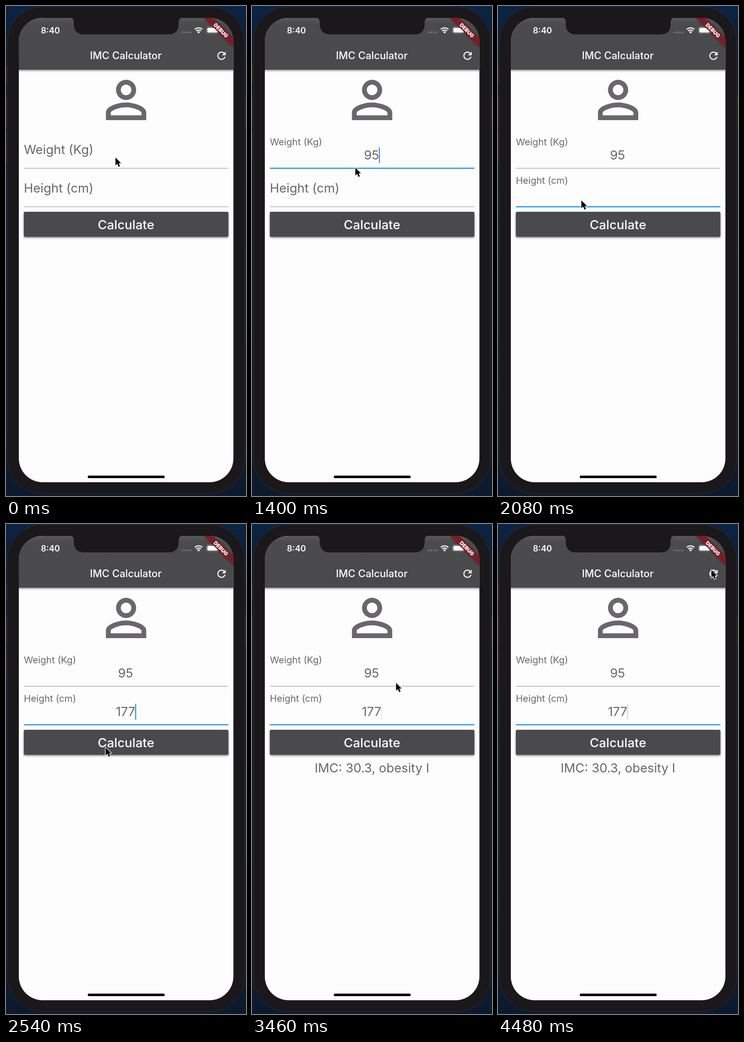
An HTML page that plays this animation: 524x1069 px, repeating every 4500 ms.

```html
<!DOCTYPE html>
<html lang="en">
<head>
<meta charset="utf-8">
<title>IMC Calculator</title>
<style>
html, body { margin: 0; width: 100%; height: 100%; overflow: hidden; background: #0a1a2e; }
svg { display: block; width: 100%; height: 100%; font-family: Inter, Roboto, sans-serif; }
.mid { text-anchor: middle; }
.grey { fill: #69676a; font-size: 27.4px; }
.rule { stroke: #8d8c8e; stroke-width: 1.2; }
.focus { stroke: #2196e8; stroke-width: 2.4; }
.caret { fill: #2b8fe0; }

/* One loop is 4500 ms: 1% = 45 ms */
.loop { animation: 4500ms linear infinite; }
.step { animation: 4500ms step-end infinite; }

.label { animation-timing-function: cubic-bezier(.4, 0, .2, 1); }
#label1 { animation-name: label1; }
#label2 { animation-name: label2; }
@keyframes label1 {
  0%, 2.222% { transform: none; }
  4.444%, 100% { transform: translateY(-19px) scale(.75); }
}
@keyframes label2 {
  0%, 37.111% { transform: none; }
  39.333%, 100% { transform: translateY(-19px) scale(.75); }
}

#focus1 { animation-name: focus1; }
#focus2 { animation-name: focus2; }
@keyframes focus1 {
  0%, 2.222% { opacity: 0; }
  4.444%, 37.111% { opacity: 1; }
  39.333%, 100% { opacity: 0; }
}
@keyframes focus2 {
  0%, 37.111% { opacity: 0; }
  39.333%, 100% { opacity: 1; }
}

#w1 { animation-name: w1; }
#w2 { animation-name: w2; }
#h1 { animation-name: h1; }
#h2 { animation-name: h2; }
#h3 { animation-name: h3; }
#result { animation-name: result; }
@keyframes w1 { 0%, 27.333%, 100% { opacity: 0; } 23.333% { opacity: 1; } }
@keyframes w2 { 0% { opacity: 0; } 27.333%, 100% { opacity: 1; } }
@keyframes h1 { 0%, 50.667%, 100% { opacity: 0; } 46.667% { opacity: 1; } }
@keyframes h2 { 0%, 54.333%, 100% { opacity: 0; } 50.667% { opacity: 1; } }
@keyframes h3 { 0% { opacity: 0; } 54.333%, 100% { opacity: 1; } }
@keyframes result { 0% { opacity: 0; } 61.333%, 100% { opacity: 1; } }

/* Carets: 250 ms on, 250 ms off, each change fading over 125 ms; typing restarts the blink */
#blink1 { animation-name: blink1; }
#blink2 { animation-name: blink2; }
#caret1 { animation-name: caret1; }
#caret2 { animation-name: caret2; }
@keyframes blink1 {
  0%, 2.221% { opacity: 0; }
  2.222%, 7.778% { opacity: 1; }
  10.556%, 13.333% { opacity: 0; }
  16.111%, 18.889% { opacity: 1; }
  21.667%, 23.332% { opacity: 0; }
  23.333%, 32.889% { opacity: 1; }
  35.667%, 100% { opacity: 0; }
}
@keyframes blink2 {
  0%, 37.11% { opacity: 0; }
  37.111%, 42.667% { opacity: 1; }
  45.444%, 46.666% { opacity: 0; }
  46.667%, 59.889% { opacity: 1; }
  62.667%, 65.444% { opacity: 0; }
  68.222%, 71% { opacity: 1; }
  73.778%, 76.556% { opacity: 0; }
  79.333%, 82.111% { opacity: 1; }
  84.889%, 87.667% { opacity: 0; }
  90.444%, 93.222% { opacity: 1; }
  96%, 98.778% { opacity: 0; }
  100% { opacity: .44; }
}
@keyframes caret1 {
  0% { transform: none; }
  23.333% { transform: translateX(9px); }
  27.333%, 100% { transform: translateX(17px); }
}
@keyframes caret2 {
  0% { transform: none; }
  46.667% { transform: translateX(6px); }
  50.667% { transform: translateX(14px); }
  54.333%, 100% { transform: translateX(22px); }
}

#pointer { animation-name: pointer; animation-timing-function: ease-in-out; }
@keyframes pointer {
  0%, 28.889% { transform: translate(239px, 330.5px); }
  35.556%, 52% { transform: translate(182px, 424px); }
  55.556%, 64% { transform: translate(217.5px, 487.5px); }
  74.667%, 79.111% { transform: translate(314.5px, 346.5px); }
  85.778%, 90.667% { transform: translate(299.5px, 326px); }
  99.111%, 100% { transform: translate(466px, 100px); }
}
</style>
</head>
<body>
<svg viewBox="0 0 524 1069" preserveAspectRatio="none">
  <defs>
    <linearGradient id="sky" x2="0" y2="1">
      <stop offset="0" stop-color="#0b2443"/>
      <stop offset=".12" stop-color="#0a1a30"/>
      <stop offset=".6" stop-color="#152130"/>
      <stop offset="1" stop-color="#0b1a2e"/>
    </linearGradient>
    <linearGradient id="bar" x2="0" y2="1">
      <stop offset="0" stop-color="#58575a"/>
      <stop offset=".12" stop-color="#4b4a4d"/>
      <stop offset="1" stop-color="#4a494b"/>
    </linearGradient>
    <clipPath id="screen"><rect x="28" y="26" width="468.5" height="1013" rx="52"/></clipPath>
    <filter id="soft" x="-10%" y="-30%" width="120%" height="160%"><feGaussianBlur stdDeviation="2"/></filter>
  </defs>

  <rect width="524" height="1069" fill="url(#sky)"/>
  <path d="M0 131h4v36h-4zM0 199h4v66h-4zM0 275h4v66h-4zM520 199h4v66h-4z" fill="#232325"/>
  <rect x="3" y="1.5" width="518" height="1062.5" rx="76" fill="#1a181b" stroke="#2e2d31"/>

  <g clip-path="url(#screen)">
    <rect x="28" y="26" width="469" height="1013" fill="#fefdfe"/>
    <rect x="20" y="60" width="485" height="81" fill="#000" opacity=".45" filter="url(#soft)"/>
    <rect x="28" y="26" width="469" height="113" fill="url(#bar)"/>

    <g fill="#fff">
      <text x="97" y="59.5" class="mid" font-size="18.2" font-weight="600">8:40</text>
      <text x="261.5" y="116" class="mid" font-size="22.2" font-weight="500">IMC Calculator</text>
      <path transform="translate(457 95) scale(1.13)" d="M17.65 6.35C16.2 4.9 14.21 4 12 4c-4.42 0-7.99 3.58-7.99 8s3.57 8 7.99 8c3.73 0 6.84-2.55 7.73-6h-2.08c-.82 2.33-3.04 4-5.65 4-3.31 0-6-2.69-6-6s2.69-6 6-6c1.66 0 3.14.69 4.22 1.78L13 11h7V4l-2.35 2.35z"/>
      <path d="M420.5 60l-3.2-3.3a4.7 4.7 0 0 1 6.4 0z"/>
    </g>
    <g fill="none" stroke="#fff" stroke-width="2.3">
      <path d="M415.3 54.4a7.5 7.5 0 0 1 10.4 0M412.2 51a12 12 0 0 1 16.6 0"/>
      <rect x="437.5" y="45.5" width="27" height="14.5" rx="4.5" stroke="#8b8a8c" stroke-width="1.1"/>
    </g>
    <rect x="439.5" y="47.5" width="23" height="10.5" rx="2.8" fill="#fff"/>
    <path d="M385.5 57.5h18" stroke="#777678" stroke-width="4" stroke-linecap="round" stroke-dasharray="0 5.8"/>

    <g transform="translate(496.5 26) rotate(45)">
      <rect x="-46" y="31.6" width="92" height="13.6" fill="#000" opacity=".45" filter="url(#soft)"/>
      <rect x="-46" y="31.6" width="92" height="13.6" fill="#7e1c23"/>
      <text y="42.5" class="mid" fill="#fff" font-size="11.3" font-weight="900">DEBUG</text>
    </g>

    <path fill="#69676a" transform="translate(196.2 139) scale(5.5)" d="M12 5.9c1.16 0 2.1.94 2.1 2.1s-.94 2.1-2.1 2.1S9.9 9.16 9.9 8s.94-2.1 2.1-2.1m0 9c2.97 0 6.1 1.46 6.1 2.1v1.1H5.9V17c0-.64 3.13-2.1 6.1-2.1M12 4C9.79 4 8 5.79 8 8s1.79 4 4 4 4-1.79 4-4-1.79-4-4-4zm0 9c-2.67 0-8 1.34-8 4v3h16v-3c0-2.66-5.33-4-8-4z"/>

    <g transform="translate(39 322.5)">
      <text id="label1" class="grey loop label">Weight (Kg)</text>
    </g>
    <g class="grey mid">
      <text id="w1" class="step" x="261" y="335">9</text>
      <text id="w2" class="step" x="261" y="335">95</text>
    </g>
    <path class="rule" d="M39 354H485.5"/>
    <path id="focus1" class="focus loop" d="M39 354H485.5"/>
    <g id="blink1" class="loop"><rect id="caret1" class="caret step" x="260" y="308.5" width="2.2" height="34.5"/></g>

    <g transform="translate(39 406.5)">
      <text id="label2" class="grey loop label">Height (cm)</text>
    </g>
    <g class="grey mid">
      <text id="h1" class="step" x="261" y="419">1</text>
      <text id="h2" class="step" x="261" y="419">17</text>
      <text id="h3" class="step" x="261" y="419">177</text>
    </g>
    <path class="rule" d="M39 438H485.5"/>
    <path id="focus2" class="focus loop" d="M39 438H485.5"/>
    <g id="blink2" class="loop"><rect id="caret2" class="caret step" x="260" y="392.5" width="2.2" height="34.5"/></g>

    <rect x="39" y="451" width="446.5" height="54.5" rx="3" fill="#000" opacity=".5" filter="url(#soft)"/>
    <rect x="39" y="449" width="446.5" height="54.5" rx="2.5" fill="#4a494b"/>
    <text x="262" y="487" class="mid" fill="#fff" font-size="27.6" font-weight="500">Calculate</text>
    <text id="result" class="grey mid step" x="262" y="541.5">IMC: 30.3, obesity I</text>

    <rect x="178.5" y="1024.5" width="168" height="5.6" rx="2.8" fill="#000"/>
  </g>

  <path fill="#1a181b" d="M139 25Q148 26 148 35V39Q148 62 171 62H354Q377 62 377 39V35Q377 26 386 25z"/>

  <g id="pointer" class="loop">
    <path d="M0 0V17.2L3.9 13.6 6.7 20.2 9.9 18.8 7.1 12.4H12.3Z" stroke="#fff" stroke-width="2.4" stroke-linejoin="round" paint-order="stroke"/>
  </g>
</svg>
</body>
</html>
```
